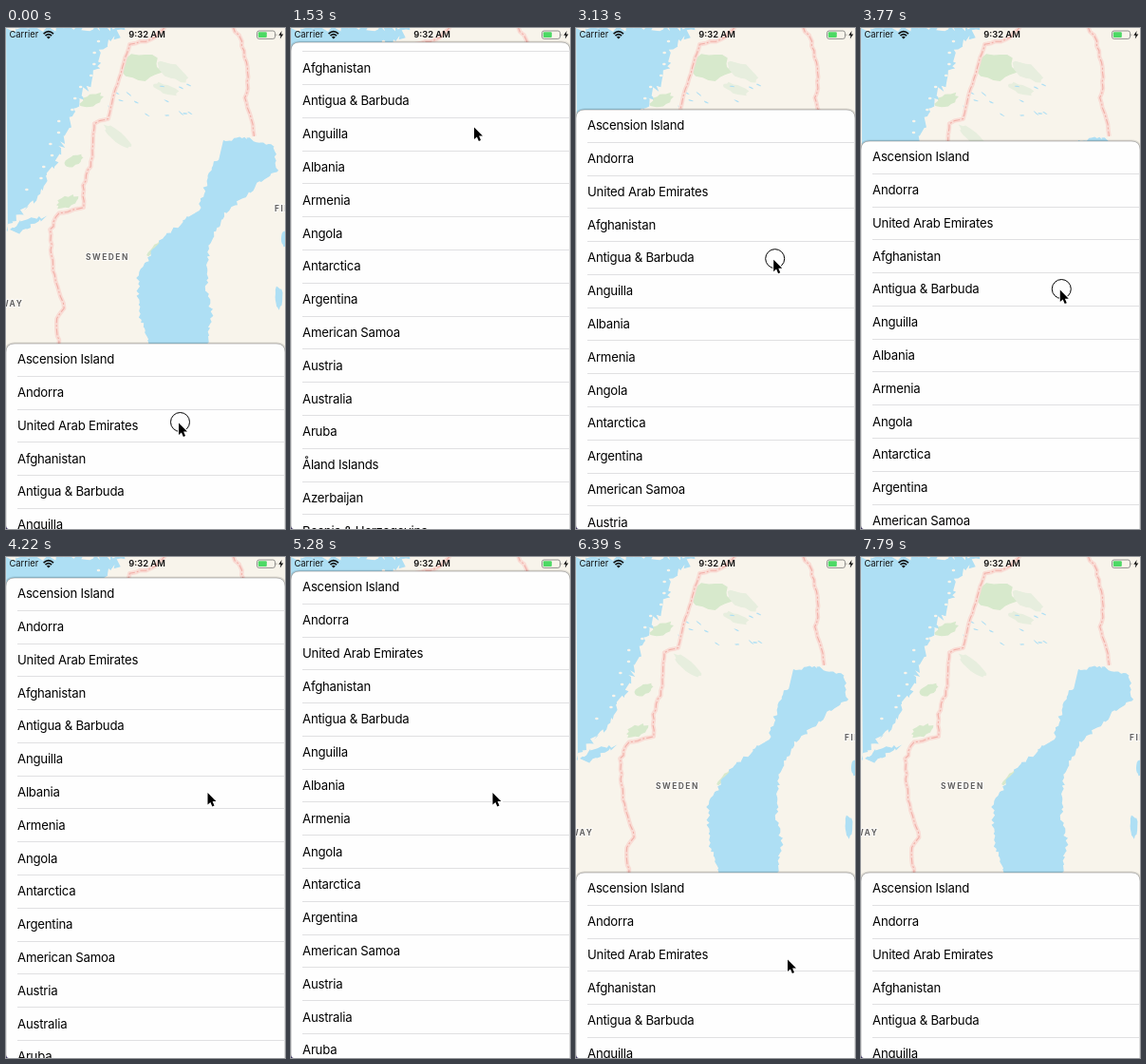
Animation, 294 px wide and 527 px high, one loop 7890 ms. Source, as an HTML page:

```html
<!DOCTYPE html>
<html lang="en">
<head>
<meta charset="utf-8">
<title>Pull-up country list over a map</title>
<style>
  html, body { margin: 0; width: 100%; height: 100%; overflow: hidden; background: #f8f4eb; }
  svg { display: block; width: 294px; height: 527px; font-family: Inter, "Liberation Sans", sans-serif; }
  .sea { fill: #aedff4; }
  .park { fill: #d7e9cc; }
  .pale { fill: #e7eede; }
  .edge { fill: none; stroke: #f9dcd5; stroke-width: 4.5; stroke-linejoin: round; }
  .line { fill: none; stroke: #f2b0a8; stroke-width: 1.1; stroke-dasharray: 7 2 2 2; }
  .place { font-size: 8.4px; font-weight: 700; letter-spacing: 1.5px; fill: #62605f; stroke: #fff; stroke-width: 1.5px; paint-order: stroke; }
  .bar { font-size: 9.4px; fill: #111; }
  .row { font-size: 13.2px; letter-spacing: -.22px; }
</style>
</head>
<body>
<svg viewBox="0 0 294 527">
  <defs>
    <clipPath id="clip"><path id="card" d="M0 527V9Q0 0 9 0H285Q294 0 294 9V527"/></clipPath>
  </defs>
  <rect width="294" height="527" fill="#f8f4eb"/>
  <g id="map"></g>
  <g class="place">
    <text x="84" y="244">SWEDEN</text>
    <text x="283" y="193">FINLAND</text>
    <text x="-6" y="293">WAY</text>
  </g>

  <g class="bar">
    <text x="3.5" y="10.3">Carrier</text>
    <text x="148.5" y="10.3" text-anchor="middle" font-weight="600">9:32 AM</text>
    <path d="M39.6 6.1Q44.8 1.3 50 6.1M41.5 8.2Q44.8 5.2 48.1 8.2" fill="none" stroke="#111" stroke-width="1.7"/>
    <path d="M42.8 9.4Q44.8 7.9 46.8 9.4L44.8 11.5Z"/>
    <rect x="264.5" y="3" width="19" height="8.4" rx="2.2" fill="none" stroke="#777" stroke-width=".8"/>
    <path d="M284.7 5.7Q286.2 7.2 284.7 8.7Z" fill="#777"/>
    <rect x="265.8" y="4.3" width="9" height="5.8" rx="1" fill="#4cd964"/>
    <path d="M290.6 3L287.3 7.8H289.5L288.8 11.4L292.3 6.5H290Z"/>
  </g>

  <g id="sheet">
    <use href="#card" fill="#fefefe" stroke="#000" stroke-opacity=".1" stroke-width="3"/>
    <use href="#card" fill="#fefefe" stroke="#000" stroke-opacity=".24"/>
    <g clip-path="url(#clip)"><g id="rows"></g></g>
  </g>
  <path d="M0 523.5Q.3 526.7 3 527H0Z" fill="#3d3360"/>

  <g id="cursor">
    <circle id="press" cx="2" cy="-.5" r="10" fill="none" stroke="#000"/>
    <path d="M.5 .5V13L3.4 10.4L5.4 15L7.5 14.1L5.6 9.6H9.5Z" stroke="#fff" stroke-width="1.8" paint-order="stroke"/>
  </g>
</svg>
<script>
const $ = id => document.getElementById(id);
const LOOP = 7890, TOP = 15, ROW = 34.8;

// --- map ---
let seed = 7, art = '';
const rand = () => (seed = seed * 16807 % 2147483647) / 2147483647 - .5;
const add = (cls, d) => art += `<path class="${cls}" d="${d}"/>`;

// Joins a few "x,y" points with a ragged line.
function rough(points, amp, step = 3) {
  const p = points.split(' ').map(s => s.split(',').map(Number));
  let d = 'M' + p[0];
  for (let i = 1; i < p.length; i++) {
    const [x, y] = p[i - 1], dx = p[i][0] - x, dy = p[i][1] - y;
    const n = Math.ceil(Math.hypot(dx, dy) / step);
    for (let k = 1; k <= n; k++)
      d += `L${x + dx * k / n + rand() * amp} ${y + dy * k / n + rand() * amp}`;
  }
  return d;
}

// Ragged ellipse, tilted by slope.
function blob(cls, x, y, rx, ry, slope = 0) {
  let d = '';
  for (let a = 0; a < 6.28; a += .35) {
    const r = 1 + rand() * .4, px = rx * r * Math.cos(a);
    d += `${d ? 'L' : 'M'}${x + px} ${y + ry * r * Math.sin(a) + px * slope}`;
  }
  add(cls, d + 'Z');
}

function border(points) {
  const d = rough(points, 2, 6);
  add('edge', d);
  add('line', d);
}

blob('park', 143, 41, 20, 14);
blob('pale', 176, 46, 15, 8, .4);
blob('pale', 168, 64, 13, 5, .3);
blob('pale', 118, 115, 14, 7, .7);
blob('park', 90, 76, 11, 7, -.3);
blob('park', 72, 139, 9, 6, -.3);
blob('park', 64, 183, 11, 6, -.3);
blob('park', 158, 231, 9, 4, -.8);

add('sea', rough('0,0 124,0 103,24 88,56 71,85 57,130 40,165 4,212 0,211', 8));
add('sea', rough('4,212 14,203 42,199 13,216', 4));
add('sea', rough('229,118 250,115 282,124 286,152 268,162 251,178 232,193 215,224 211,270 217,300 210,340 154,340 140,300 139,262 160,226 203,191 212,160 223,137', 4));
blob('sea', 287, 283, 4, 12);
blob('sea', 293, 222, 3, 8);

// Lakes inland and islands along the coast.
for (let i = 0; i < 14; i++) blob('sea', 165 + rand() * 120, 78 + rand() * 36, 2.5, .7, rand() + .4);
for (let i = 0; i < 14; i++) {
  const u = i / 14;
  art += `<ellipse cx="${100 - 80 * u + rand() * 14}" cy="${14 + 168 * u}" rx="1.8" ry="1.2" fill="#f8f4eb"/>`;
}

border('168,-2 153,13 131,17 122,42 107,95 93,100 90,140 82,165 82,189 55,195 47,212 49,255 62,294 53,306 56,340');
border('239,-2 248,13 256,52 252,73 262,113');
$('map').innerHTML = art;

// --- list ---
const countries = ['Ascension Island', 'Andorra', 'United Arab Emirates', 'Afghanistan', 'Antigua & Barbuda',
  'Anguilla', 'Albania', 'Armenia', 'Angola', 'Antarctica', 'Argentina', 'American Samoa', 'Austria', 'Australia',
  'Aruba', 'Åland Islands', 'Azerbaijan', 'Bosnia & Herzegovina', 'Barbados'];
$('rows').innerHTML = countries.map((name, i) =>
  `<text class="row" x="12" y="${i * ROW + 21.2}">${name.replace('&', '&amp;')}</text>
   <rect x="12" y="${Math.floor((i + 1) * ROW - .6)}" width="282" height="1" fill="#e0e0e2"/>`).join('');

// --- motion ---
// Each move: start, end, destination, then softness of its start and finish.
const sheetMoves = [
  [1010, 1870, [-105.4], 2.5, 8.3],
  [2450, 3360, [128], 2.6, 2.7],
  [3540, 4390, [15], 3, 3.9],
  [5280, 6450, [332], 4.5, 19]];
const cursorMoves = [
  [1010, 1490, [192.5, 104], 2, 2],
  [2100, 2270, [204, 61], 2, 2],
  [2450, 3360, [208.5, 283], 2.6, 2.7],
  [3540, 3920, [212, 247.5], 3, 1],
  [5280, 5800, [222.5, 423], 2.5, 2],
  [6860, 7150, [254, 529], 2, 1.5]];
const presses = [[0, 60], [1010, 1440], [2270, 3900], [5340, 5790]];

const ease = (u, a, b) => 1 - (1 - u ** a) ** b;
function follow(start, moves, t) {
  return moves.reduce((pos, [t0, t1, to, a, b]) => {
    const e = ease(Math.min(1, Math.max(0, (t - t0) / (t1 - t0))), a, b);
    return pos.map((v, i) => v + (to[i] - v) * e);
  }, start);
}
const move = (id, x, y) => $(id).setAttribute('transform', `translate(${x} ${y})`);
const show = (id, on) => $(id).style.display = on ? '' : 'none';

function draw() {
  const t = performance.now() % LOOP;
  const edge = Math.round(follow([332], sheetMoves, t)[0]);
  move('sheet', 0, Math.max(TOP, edge));
  move('rows', 0, Math.min(0, edge - TOP)); // past the top, the list scrolls
  move('cursor', ...follow([181.5, 415], cursorMoves, t));
  show('cursor', t < 7150);
  show('press', presses.some(([a, b]) => t >= a && t < b));
  requestAnimationFrame(draw);
}
draw();
</script>
</body>
</html>
```
